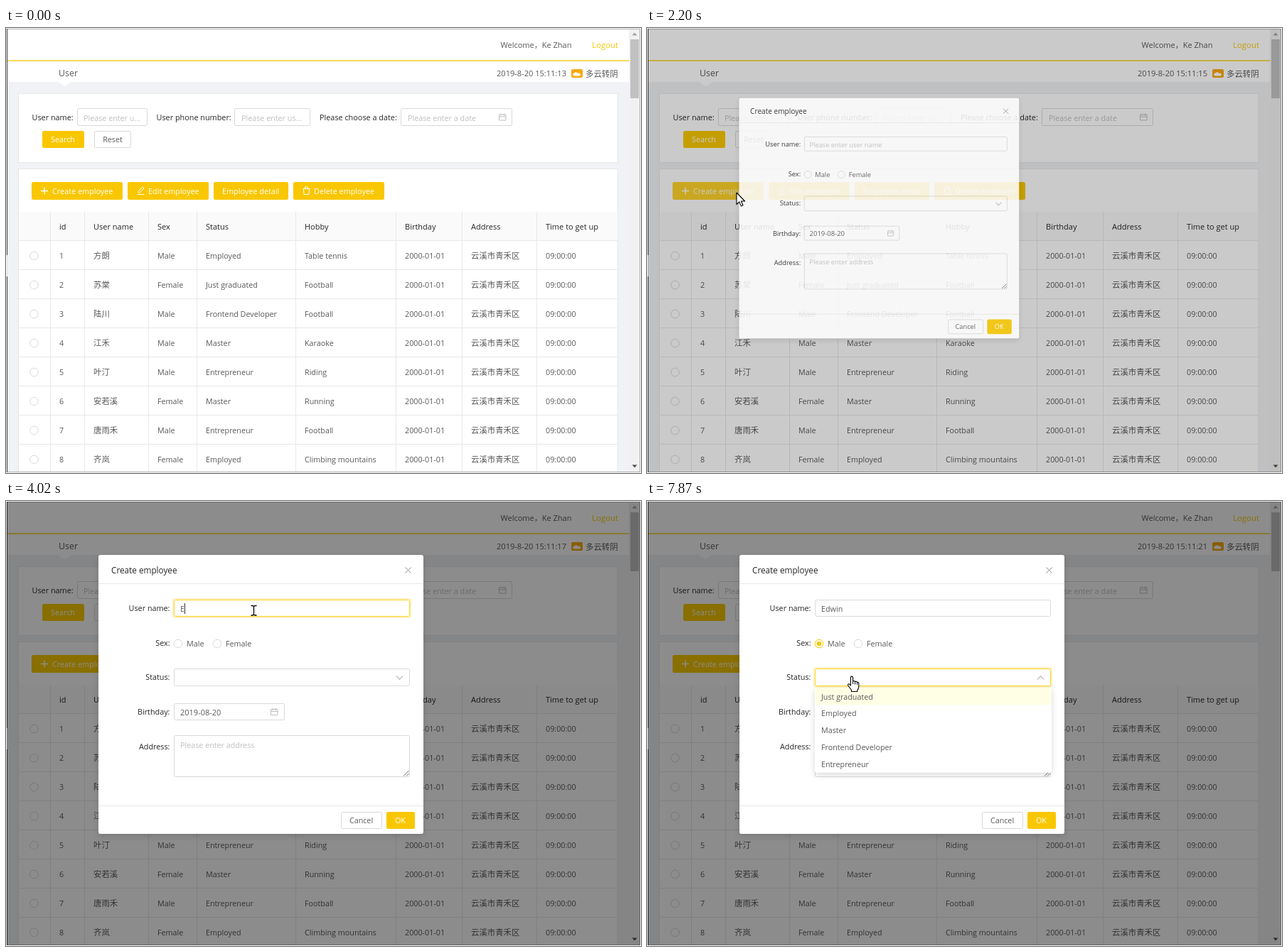
Animation, 893 px wide and 627 px high, one loop 8000 ms. Source, as an HTML page:

```html
<!DOCTYPE html>
<html lang="en">
<head>
<meta charset="utf-8">
<title>Employee admin</title>
<style>
  html, body { margin: 0; width: 893px; height: 627px; overflow: hidden; background: #fff; }
  svg { display: block; }
  text { font-family: "Open Sans", "Noto Sans CJK SC", "Noto Sans CJK", sans-serif; white-space: pre; }
</style>
</head>
<body>
<svg id="stage" width="893" height="627" viewBox="0 0 893 627"></svg>
<script>
const LOOP = 8000, TICK = 78.8, BLINK = 510;
const GOLD = '#f9c700', HOVER = '#ffd32a', LINE = '#e8e8e8', EDGE = '#d9d9d9';
const INK = '#262626', BODY = '#595959', HINT = '#bfbfbf';

// ---- drawing helpers
const text = (x, y, s, { size = 10.75, fill = BODY, anchor = 'start', weight = 400, id = '' } = {}) =>
  `<text ${id && `id="${id}"`} x="${x}" y="${y}" font-size="${size}" fill="${fill}" text-anchor="${anchor}" font-weight="${weight}">${s}</text>`;
const rect = (x, y, w, h, fill, extra = '') =>
  `<rect x="${x}" y="${y}" width="${w}" height="${h}" fill="${fill}" ${extra}/>`;
const box = (x, y, w, h, id = '') =>
  rect(x + .5, y + .5, w - 1, h - 1, '#fff', `rx="2" stroke="${EDGE}" ${id && `id="${id}"`}`);
const path = (d, stroke, extra = '') => `<path d="${d}" fill="none" stroke="${stroke}" ${extra}/>`;
const solid = (d, fill) => `<path d="${d}" fill="${fill}"/>`;
const radio = (x, y, id = '') =>
  `<circle cx="${x}" cy="${y}" r="5.8" fill="#fff" stroke="${EDGE}" ${id && `id="${id}"`}/>`;
const calendar = (x, y) =>
  path(`M${x} ${y + 1.5}h9.5v8h-9.5zM${x} ${y + 4.5}h9.5M${x + 2.5} ${y}v3M${x + 7} ${y}v3`, HINT);
const glow = (x, y, w, h, id) =>
  rect(x - 1, y - 1, w + 2, h + 2, 'none', `id="${id}" rx="3" stroke="${GOLD}" stroke-opacity=".25" stroke-width="2"`);

// ---- page
const dividers = [62, 110, 200, 268, 407, 548, 641, 746];
const heads = ['id', 'User name', 'Sex', 'Status', 'Hobby', 'Birthday', 'Address', 'Time to get up'];
const people = [
  ['方朗', 'Male', 'Employed', 'Table tennis'],
  ['苏棠', 'Female', 'Just graduated', 'Football'],
  ['陆川', 'Male', 'Frontend Developer', 'Football'],
  ['江禾', 'Male', 'Master', 'Karaoke'],
  ['叶汀', 'Male', 'Entrepreneur', 'Riding'],
  ['安若溪', 'Female', 'Master', 'Running'],
  ['唐雨禾', 'Male', 'Entrepreneur', 'Football'],
  ['齐岚', 'Female', 'Employed', 'Climbing mountains'],
];
const CJK = /[\u4e00-\u9fff]/;

function table() {
  const cell = (s, i, y, style) => text(dividers[i] + 13, y, s, style);
  let out = rect(18, 259, 842, 40, '#fafafa');
  heads.forEach((h, i) => out += cell(h, i, 283.5, { size: 11, fill: INK, weight: 500 }));
  people.forEach((p, r) => {
    const y = 299 + 41 * r;
    out += rect(18, y, 842, 1, LINE) + radio(39.5, y + 22);
    [r + 1, ...p, '2000-01-01', '云溪市青禾区', '09:00:00'].forEach((s, i) =>
      out += cell(s, i, y + 25.5, { size: CJK.test(s) ? 11.4 : 10.75 }));
  });
  dividers.forEach(x => out += rect(x, 259, 1, 367, LINE));
  return out;
}

const button = (x, w, label, tx, id = '') =>
  rect(x, 217, w, 25, GOLD, `rx="2.5" ${id && `id="${id}"`}`) +
  text(tx, 233.5, label, { size: 10.85, fill: '#fff' });

function page() {
  const label = (x, s) => text(x, 130, s, { size: 10.85, fill: INK });
  const hint = (x, s) => text(x, 130.5, s, { fill: HINT });
  return rect(1, 1, 891, 625, '#f0f2f5') +
    rect(1, 1, 875, 75, '#fff') + rect(1, 45.25, 875, 1.5, '#f8d01e') +
    solid('M73 76h19l-9.5 6z', '#fff') +
    text(695.5, 27.5, 'Welcome，Ke Zhan', { size: 11 }) +
    text(861, 27.5, 'Logout', { size: 11.4, fill: GOLD, anchor: 'end' }) +
    text(74, 67.5, 'User', { size: 12.4 }) +
    text(690, 68, '', { size: 11.05, id: 'clock' }) +
    rect(795, 58, 16, 12, '#f8a80c', 'rx="2"') +
    solid('M799 67.5a2 2 0 0 1 .3-4 3 3 0 0 1 5.2.6 2 2 0 0 1 2.5 3.4z', '#fff') +
    text(815, 68.5, '多云转阴', { size: 11.4 }) +
    rect(17.5, 92.5, 842.5, 97, '#fff', `stroke="${LINE}"`) +
    rect(17.5, 198.5, 842.5, 440, '#fff', `stroke="${LINE}"`) +
    label(36.5, 'User name:') + box(100, 113, 99, 25) + hint(109, 'Please enter u...') +
    label(211.5, 'User phone number:') + box(321, 113, 107, 25) + hint(331, 'Please enter us...') +
    label(441, 'Please choose a date:') + box(555, 113, 157, 25) + hint(565, 'Please enter a date') +
    calendar(693.5, 120.5) +
    rect(51, 145, 59, 24, GOLD, 'rx="2.5"') + text(80, 161, 'Search', { fill: '#fff', anchor: 'middle' }) +
    box(124, 145, 52, 24) + text(150, 161, 'Reset', { anchor: 'middle' }) +
    button(36, 128, 'Create employee', 65, 'create') + path('M49 229.5h10M54 224.5v10', '#fff', 'stroke-width="1.4"') +
    button(171, 114, 'Edit employee', 200) + path('M186 232l.5-2.5 5.5-5.5 2 2-5.5 5.5zM184.5 234.5h10', '#fff') +
    button(292, 105, 'Employee detail', 304) +
    button(404, 128, 'Delete employee', 433) + path('M417.5 226.5h10M420.5 226v-2h4v2M418.5 227l.6 7.5h6.8l.6-7.5', '#fff') +
    table() +
    rect(876, 1, 15, 625, '#f1f1f1') + rect(878, 16, 12, 83, '#c1c1c1') +
    solid('M880.5 10.5h7l-3.5-4z', '#a3a3a3') + solid('M880.5 615.5h7l-3.5 4z', '#505050') +
    rect(1.5, 1.5, 890, 624, 'none', 'stroke="#b0b0b0"') +
    rect(1, 1, 1, 625, '#333') + rect(1, 320, 1, 30, '#ddd');
}

// ---- dialog
const options = ['Just graduated', 'Employed', 'Master', 'Frontend Developer', 'Entrepreneur'];

function dialog() {
  const label = (y, s) => text(230.5, y, s + ':', { size: 10.8, fill: INK, anchor: 'end' });
  return rect(130, 76, 457, 393, '#fff', 'rx="3" filter="url(#soft)"') +
    text(148, 101.5, 'Create employee', { size: 11.75, fill: INK, weight: 500 }) +
    path('M561.5 93.5l8 8M569.5 93.5l-8 8', '#8c8c8c') +
    rect(130, 116, 457, 1, LINE) + rect(130, 429, 457, 1, LINE) +
    label(155, 'User name') + glow(236, 139, 332, 24, 'nameGlow') + box(236, 139, 332, 24, 'nameBox') +
    text(245, 156, 'Please enter user name', { fill: HINT, id: 'nameHint' }) +
    text(245, 156, '', { id: 'typed' }) + rect(244, 144, 1, 15, '#333', 'id="caret"') +
    label(204, 'Sex') + radio(242, 201, 'male') + `<circle id="dot" cx="242" cy="201" r="0" fill="${GOLD}"/>` +
    text(254, 205, 'Male') + radio(297, 201) + text(309, 205, 'Female') +
    label(252, 'Status') + glow(236, 236, 332, 25, 'statusGlow') + box(236, 236, 332, 25, 'statusBox') +
    path('M549 246.5l4.5 5 4.5-5', HINT, 'id="chevron" stroke-width="1.2"') +
    label(301, 'Birthday') + box(236, 285, 156, 24) + text(245, 301.5, '2019-08-20', { size: 11 }) + calendar(372.5, 292) +
    label(349.5, 'Address') + box(236, 330, 332, 59) + text(245, 347.5, 'Please enter address', { fill: HINT }) +
    path('M559 387.5l7.5-7.5M563 387.5l3.5-3.5', '#666') +
    box(471, 438, 58, 24) + text(499.5, 454, 'Cancel', { anchor: 'middle' }) +
    rect(535, 438, 40, 24, GOLD, 'rx="2.5"') + text(554.5, 454, 'OK', { fill: '#fff', anchor: 'middle' }) +
    '<g id="menu">' + rect(236, 263, 333, 119.5, '#fff', 'rx="2" filter="url(#soft)"') +
    rect(236, 263, 333, 24.5, '#ffffe6') +
    options.map((s, i) => text(245, 279.5 + 23.9 * i, s)).join('') + '</g>';
}

const outline = 'stroke="#000" stroke-width="1.1" stroke-linejoin="round"';
const cursors =
  `<path id="arrow" d="M0 0v16.5l3.8-3.6 2.6 6 2.6-1.2-2.6-5.7h5.2z" fill="#fff" ${outline}/>` +
  `<g id="hand"><path d="M-1.6 1.2Q0-1 1.6 1.2V7Q3.6 5.6 4.6 7.5 6.6 6.4 7.6 8.4 9.6 7.8 9.8 10V15Q9.6 18 7.8 19.5V21.5H-.4V19.5L-5.2 13Q-6 10.5-3.6 10.8L-1.6 13z" fill="#fff" ${outline}/>` +
  path('M1.6 7v4M4.6 7.5v4M7.6 8.4v3.4', '#000') + '</g>' +
  path('M-3.5-6.5H-1L.5-5.5 2-6.5H4.5M.5-5.5V6M-3.5 7H-1L.5 6 2 7H4.5', '#000', 'id="beam" stroke-width="1.3"');

const stage = document.getElementById('stage');
stage.innerHTML =
  '<defs><filter id="soft" x="-20%" y="-20%" width="140%" height="140%"><feDropShadow dx="0" dy="3" stdDeviation="4.5" flood-opacity=".15"/></filter></defs>' +
  page() + rect(1, 1, 891, 625, '#000', 'id="mask"') +
  `<g id="dialog">${dialog()}</g><g id="cursor">${cursors}</g>` +
  rect(.5, .5, 892, 626, 'none', 'stroke="#fff"');

const $ = {};
stage.querySelectorAll('[id]').forEach(e => $[e.id] = e);
const set = (e, attrs) => { for (const k in attrs) e.setAttribute(k, attrs[k]); };

// ---- motion
const OPEN = 2110, FOCUS = 2970, BLUR = 6950, SELECT = 7550;
const keys = [4020, 4330, 4480, 4560, 4790];
// Each move: start, end, destination x and y.
const moves = [
  [530, 1080, 72, 290], [1080, 1800, 126, 232], [2360, 2990, 348, 154],
  [5960, 6750, 246, 203], [7070, 7550, 288, 247],
];

const ramp = (t, start, length) => Math.min(1, Math.max(0, (t - start) / length));
const smooth = p => p * p * (3 - 2 * p);
const mix = (a, b, p) => a + (b - a) * p;

// cubic-bezier(.08, .82, .17, 1)
function easeOut(p) {
  const curve = (a, b, s) => 3 * s * (1 - s) ** 2 * a + 3 * s * s * (1 - s) * b + s ** 3;
  let lo = 0, hi = 1;
  for (let i = 0; i < 20; i++) {
    const mid = (lo + hi) / 2;
    if (curve(.08, .17, mid) < p) lo = mid; else hi = mid;
  }
  return p <= 0 ? 0 : p >= 1 ? 1 : curve(.82, 1, lo);
}

function pointer(t) {
  let x = 788, y = 609;
  for (const [start, end, toX, toY] of moves) {
    const p = smooth(ramp(t, start, end - start));
    x = mix(x, toX, p);
    y = mix(y, toY, p);
  }
  return [Math.round(x), Math.round(y)];
}

function shapeAt(x, y, opened) {
  const over = (l, top, r, b) => x >= l && x < r && y >= top && y < b;
  if (!opened) return over(36, 217, 164, 242) ? 'hand' : 'arrow';
  if (over(236, 139, 568, 163)) return 'beam';
  return over(236, 194, 280, 209) || over(236, 236, 568, 261) ? 'hand' : 'arrow';
}

function render(now) {
  // Smooth motion advances in ticks, like a screen recording.
  const t = 220 + Math.floor((now - 220) / TICK) * TICK;

  $.clock.textContent = '2019-8-20 15:11:' + (13 + Math.floor((now + 800) / 1020));

  const lit = ramp(t, 1440, 200) - ramp(t, 2190, 200);
  set($.create, { fill: `rgb(${mix(249, 255, lit)},${mix(199, 211, lit)},${mix(0, 42, lit)})` });
  set($.mask, { opacity: .45 * ramp(t, 2100, 195) });

  const z = easeOut(ramp(t, OPEN + 2, 280));
  set($.dialog, { opacity: z, transform: `translate(127 240) scale(${z}) translate(-127 -240)` });

  const focused = now >= FOCUS && now < BLUR;
  set($.nameBox, { stroke: focused ? HOVER : EDGE });
  set($.nameGlow, { opacity: ramp(t, FOCUS, 150) - ramp(t, BLUR - 170, 150) });

  const typed = keys.filter(k => now >= k);
  $.typed.textContent = 'Edwin'.slice(0, typed.length);
  set($.nameHint, { opacity: typed.length ? 0 : 1 });
  const blink = Math.floor((now - (typed.at(-1) ?? FOCUS)) / BLINK) % 2;
  set($.caret, {
    x: typed.length ? Math.round(245 + $.typed.getComputedTextLength()) : 244,
    opacity: focused && !blink ? 1 : 0,
  });

  const [x, y] = pointer(t), shape = shapeAt(x, y, now >= 2200);
  set($.male, { stroke: now >= 6670 ? GOLD : EDGE });
  set($.dot, { r: 3.3 * easeOut(ramp(t, BLUR, 250)) });

  const o = easeOut(ramp(t, SELECT - 50, 250));
  set($.statusBox, { stroke: now >= 7390 ? HOVER : EDGE });
  set($.statusGlow, { opacity: o });
  set($.chevron, { transform: `rotate(${180 * o} 553.5 249)` });
  set($.menu, { opacity: o, transform: `translate(0 263) scale(1 ${.8 + .2 * o}) translate(0 -263)` });

  set($.cursor, { transform: `translate(${x} ${y})`, opacity: now >= moves[0][0] ? 1 : 0 });
  for (const name of ['arrow', 'hand', 'beam']) set($[name], { display: name === shape ? 'inline' : 'none' });
}

const start = performance.now();
function loop() {
  render((performance.now() - start) % LOOP);
  requestAnimationFrame(loop);
}
loop();
</script>
</body>
</html>
```
